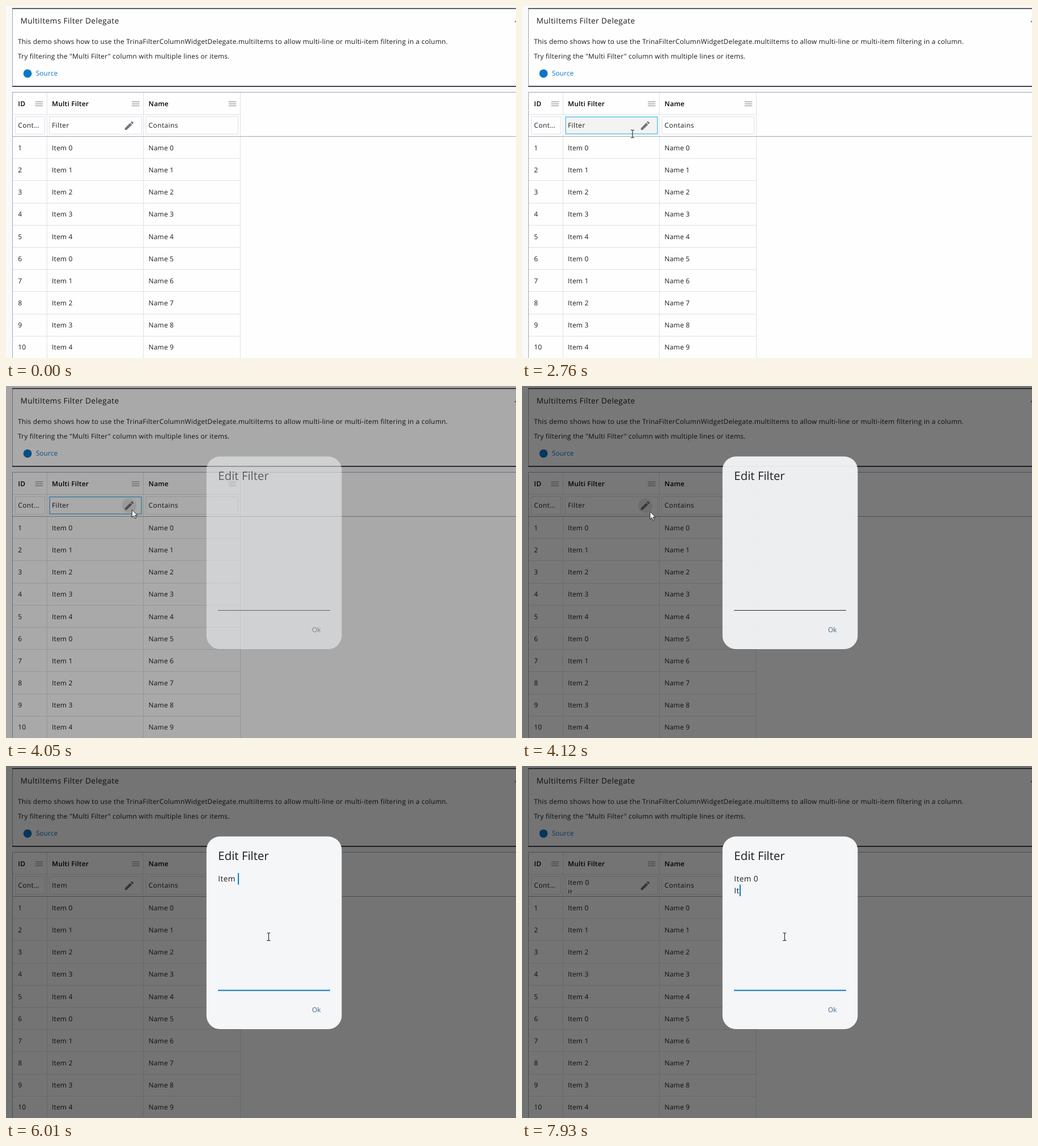
These frames come from a looping animation (900 px wide and 622 px high, 8 s). An HTML page:

```html
<!DOCTYPE html>
<html lang="en">
<head>
<meta charset="utf-8">
<title>Multi-item filter</title>
<style>
  html, body { margin: 0; width: 100%; height: 100%; overflow: hidden; background: #f8f9fb; }
  svg { display: block; }
  text {
    font: 11.92px "Open Sans", "Noto Sans", sans-serif;
    letter-spacing: .213px; fill: #1b1b1d; white-space: pre;
    text-rendering: geometricPrecision;
  }
  .large { font-size: 13.63px; letter-spacing: .426px; }
  .headline { font-size: 20.44px; letter-spacing: 0; }
  .head { font-weight: 600; fill: #000; }
  .body { letter-spacing: .236px; }
  .input { letter-spacing: .426px; }
  .label { letter-spacing: .085px; }
</style>
</head>
<body>
<svg id="stage" width="900" height="622" viewBox="0 0 900 622">
  <defs>
    <clipPath id="fieldClip"><rect x="77" y="196" width="162" height="29"/></clipPath>
  </defs>
  <rect width="900" height="622" fill="#f8f9fb"/>

  <rect x="11.5" y="4.5" width="900" height="137.5" fill="#fefefe" stroke="#a2a2aa"/>
  <path d="M11 4.5H900" stroke="#26252a" stroke-width="1.4"/>
  <path d="M11 142H900" stroke="#45424c" stroke-width="1.8"/>
  <path d="M898 28.5L901 25.5" stroke="#444" stroke-width="1.2"/>
  <text class="large" x="25.5" y="30.5">MultiItems Filter Delegate</text>
  <text class="body" x="20.9" y="67">This demo shows how to use the TrinaFilterColumnWidgetDelegate.multiItems to allow multi-line or multi-item filtering in a column.</text>
  <text class="body" x="20.9" y="92.6">Try filtering the "Multi Filter" column with multiple lines or items.</text>
  <circle cx="38" cy="119.3" r="7.4" fill="#0b76c8"/>
  <text class="label" x="52.7" y="123.4" style="fill:#0b76c8">Source</text>

  <rect x="11.5" y="152.5" width="900" height="480" fill="#fefefe" stroke="#a3a6af"/>
  <g id="grid"></g>
  <path d="M12 230.5H900" stroke="#a3a6af"/>

  <rect id="field"/>
  <circle id="hover" cx="217.4" cy="211.4" r="12.8" fill="#e9e9e9"/>
  <path transform="translate(207.2 201.2) scale(.8517)" fill="#757575"
    d="M3 17.25V21h3.75L17.81 9.94l-3.75-3.75zM20.71 7.04c.39-.39.39-1.02 0-1.41l-2.34-2.34c-.39-.39-1.02-.39-1.41 0l-1.83 1.83 3.75 3.75z"/>
  <g clip-path="url(#fieldClip)">
    <text class="input" id="filter1" x="81"></text>
    <text class="input" id="filter2" x="81" y="227.4"></text>
  </g>

  <rect id="scrim" width="900" height="622"/>
  <g id="dialog">
    <rect x="353.8" y="124.6" width="238.6" height="340.4" rx="23.8" fill="#f4f6f8"/>
    <text class="headline" x="374.3" y="166.3">Edit Filter</text>
    <text class="large" id="line1" x="374.2" y="204.2"></text>
    <text class="large" id="line2" x="374.2" y="224.6"></text>
    <path id="underline" d="M374 396.5H572"/>
    <text class="label" x="540" y="435.4" style="fill:#456688">Ok</text>
    <rect id="caret" width="2" height="20.4" fill="#0d78c4"/>
  </g>

  <circle id="press" r="11" fill="#f4ea20" opacity=".75"/>
  <g id="pointer">
    <path id="arrow" fill="#fff" stroke="#111" stroke-width=".9" stroke-linejoin="round"
      d="M0 0V13.4L3.1 10.6L5.2 15.4L7.4 14.4L5.3 9.8H9.5Z"/>
    <path id="beam" fill="none" stroke="#222" stroke-width="1.1"
      d="M-3 -6.7H-1L0 -6L1 -6.7H3M0 -6V6M-3 6.7H-1L0 6L1 6.7H3"/>
    <path id="hand" fill="#fff" stroke="#111" stroke-width="1" stroke-linejoin="round"
      d="M-1.7 11V1.5Q-1.7 0 -.3 0T1.1 1.5V7Q3.4 5.6 4 7.6Q6 6.6 6.6 8.4Q8.8 7.6 8.8 10V14Q8.8 16 7.5 17.5V20H-.2V18Q-3 15 -5 11.8Q-6 9.8 -4.5 9.2Q-3.3 9 -1.7 11Z"/>
  </g>
</svg>
<script>
  const DURATION = 8000, ROW = 39.18;
  const $ = id => document.getElementById(id);
  const show = (id, on) => $(id).setAttribute("display", on ? "inline" : "none");
  const attrs = (id, values) => {
    for (const key in values) $(id).setAttribute(key, values[key]);
  };

  const label = (x, y, text, cls = "") => `<text class="${cls}" x="${x}" y="${y}">${text}</text>`;
  const line = (d, color = "#dde1ea", width = 1) =>
    `<path d="${d}" fill="none" stroke="${color}" stroke-width="${width}"/>`;

  function buildGrid() {
    let out = line("M12 191.5H413") + line("M72.3 153V622M242.5 153V622M413.5 153V622");
    out += line("M16.5 195.5H68.5V226.5H16.5ZM247 195.5H409.5V226.5H247Z");
    [["ID", 21.3, 51.5], ["Multi Filter", 81, 222], ["Name", 251.6, 392.8]].forEach(([name, x, menu]) => {
      out += label(x, 177, name, "head");
      out += line([169.3, 172.8, 176.3].map(y => `M${menu} ${y}h13.5`).join(""), "#999", 1.2);
    });
    out += label(21.3, 215.4, "Cont…", "input") + label(251.6, 215.4, "Contains", "input");
    for (let i = 0; i < 10; i++) {
      const y = 254.8 + i * ROW;
      out += label(21.3, y, i + 1) + label(81, y, "Item " + i % 5) + label(251.6, y, "Name " + i);
      out += line(`M12 ${Math.floor(230.6 + (i + 1) * ROW) + .5}H413`);
    }
    $("grid").innerHTML = out;
  }

  // Pointer moves: first step, last step, number of steps, destination.
  const start = [482, 645];
  const moves = [
    [500, 1260, 11, 290, 263],
    [1320, 2080, 12, 199.5, 212],
    [2290, 2760, 6, 195, 226],
    [2960, 3300, 6, 203, 237],
    [3370, 3720, 6, 218.7, 215.5],
    [4050, 4120, 2, 226, 222],
    [4187, 4394, 4, 463.5, 301.7]
  ];
  const presses = [[2150, 2220], [3980, 4050], [4460, 4530]];
  const caretOn = [[4460, 5000], [5540, 6940], [7200, 8000]];
  const typed = [5630, 5730, 5820, 5920, 6010, 6410, 7200, 7660, 7930];
  const script = "Item 0\nIt";
  const within = (t, spans) => spans.some(([a, b]) => t >= a && t < b);
  const smooth = p => p * p * (3 - 2 * p);

  function pointerAt(t) {
    let [x, y] = start;
    for (const [from, to, steps, tx, ty] of moves) {
      if (t < from) break;
      const step = Math.floor((t - from) / (to - from) * (steps - 1) + 1e-6) + 1;
      const p = smooth(Math.min(1, step / steps));
      x += (tx - x) * p;
      y += (ty - y) * p;
    }
    return [x, y];
  }

  function pointerShape(t, x, y) {
    if (t >= 4050) return x > 374 && y > 187 && y < 397 ? "beam" : "arrow";
    const inField = x > 77 && x < 239 && y > 195 && y < 227;
    return !inField ? "arrow" : x > 206 && t > 2960 ? "hand" : "beam";
  }

  function drawPointer(t) {
    const [x, y] = pointerAt(t), shape = pointerShape(t, x, y);
    attrs("pointer", { transform: `translate(${x} ${y})` });
    attrs("press", { transform: `translate(${x - 1} ${y})` });
    ["arrow", "beam", "hand"].forEach(name => show(name, name === shape));
    show("press", within(t, presses));
    show("hover", shape === "hand" || t >= 4050 && t < 4187);
  }

  function drawField(t, lines) {
    const focused = t >= 2220 && t < 4118;
    const inset = focused ? .5 : 0;
    attrs("field", {
      x: 76.5 + inset, y: 195.5 + inset,
      width: 163 - 2 * inset, height: 31 - 2 * inset,
      fill: focused && t < 4050 ? "#f3f3f3" : "#fefefe",
      stroke: focused ? "#7ccbee" : "#dde1ea",
      "stroke-width": focused ? 1.8 : 1
    });
    const multi = lines.length > 1;
    attrs("filter1", { y: multi ? 210.4 : 215.4 });
    $("filter1").textContent = lines[0] || "Filter";
    $("filter2").textContent = lines[1] || "";
  }

  function drawDialog(t, lines) {
    const held = 3980 + Math.floor((t - 3980) / 69) * 69;
    const p = Math.min(1, Math.max(0, (held - 3991) / 150));
    attrs("scrim", { opacity: .54 * (1 - (1 - p) ** 2) });
    attrs("dialog", { opacity: 1 - (1 - p) ** 1.5 });
    const focused = t >= 4460;
    attrs("underline", { stroke: focused ? "#0d78c4" : "#222", "stroke-width": focused ? 2 : 1 });
    $("line1").textContent = lines[0];
    $("line2").textContent = lines[1] || "";
    const last = lines.length;
    attrs("caret", {
      x: 374.5 + (lines[last - 1] ? $("line" + last).getComputedTextLength() : 0),
      y: 189.2 + 20.4 * (last - 1)
    });
    show("caret", within(t, caretOn));
  }

  function render(t) {
    const lines = script.slice(0, typed.filter(at => t >= at).length).split("\n");
    drawField(t, lines);
    drawDialog(t, lines);
    drawPointer(t);
  }

  buildGrid();
  render(0);
  const origin = performance.now();
  (function tick() {
    render((performance.now() - origin) % DURATION);
    requestAnimationFrame(tick);
  })();
</script>
</body>
</html>
```
